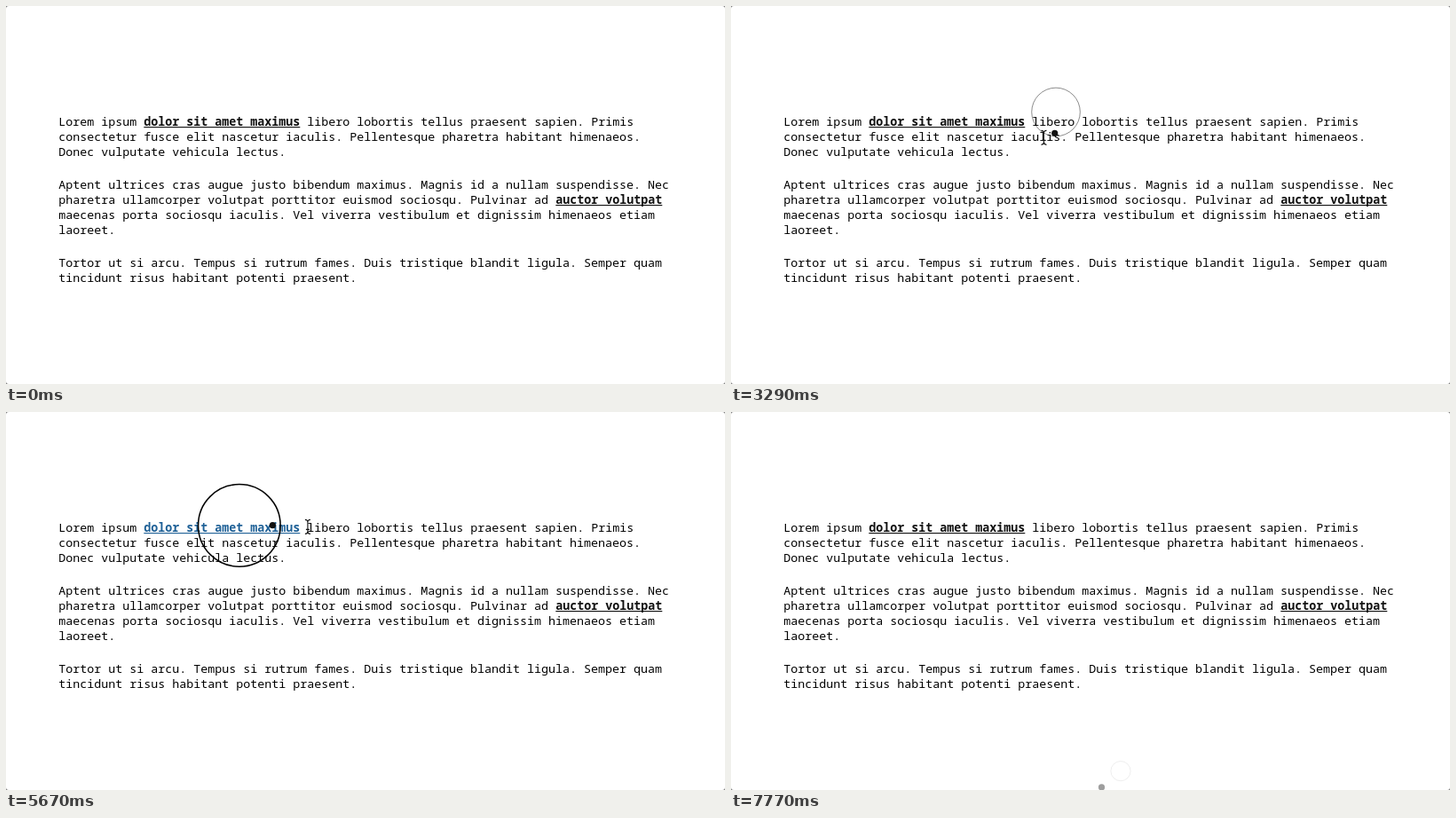
An HTML page that plays this animation: 810 px wide and 426 px high, repeating every 7.84 s.

```html
<!DOCTYPE html>
<html lang="la">
<head>
<meta charset="utf-8">
<title>Cursor follower</title>
<style>
  html, body { margin: 0; width: 100%; height: 100%; overflow: hidden; background: #777; }
  svg { display: block; width: 100%; height: 100%; }
  text { font: 500 13.333px "Noto Sans Mono", "DejaVu Sans Mono", monospace; fill: #000; white-space: pre; }
  .link text { font-weight: 600; fill: inherit; }
</style>
</head>
<body>
<svg viewBox="0 0 810 426">
  <rect width="810" height="426" rx="3" fill="#fff"/>
  <g id="copy"></g>
  <circle id="ring" r="27.3" fill="none" stroke="#000" stroke-width=".9"/>
  <circle id="dot" r="3.6" fill="#111"/>
  <g id="pointer" stroke-linejoin="round">
    <path id="arrow" d="M0 0V15L3.6 11.8 6 17.2 8.6 16 6.2 11H11Z" fill="#000" stroke="#fff"/>
    <path id="beam" d="M-3-8Q0-8 0-5V5Q0 8-3 8M3-8Q0-8 0-5M0 5Q0 8 3 8M-2 3H2" fill="none" stroke="#111" stroke-width="1.1"/>
    <path id="hand" d="M-1 1C-2-1 1-2 2 1L4 7C5 5 7 6 7 7 8 5.5 10 6 10 8 11 7 13 8 12.5 10L12 14 10.5 17H3L0 13-4 9C-5 7-3 6.5-1 8L1 9ZM4.5 11V14M7 11V14M9.5 11V14" fill="#fff" stroke="#111"/>
  </g>
</svg>
<script>
const LOOP = 7840, FRAME = 70, STEP = 10;
const LEFT = 59.3, CHAR = 8, LEADING = 17, PARAGRAPH_GAP = 20;
const DOT_LAG = 75, RING_LAG = 250;
const ENTER = 890, LEAVE = 7600;
const $ = id => document.getElementById(id);

// Asterisks enclose links; an empty line separates paragraphs.
const copy = `Lorem ipsum *dolor sit amet maximus* libero lobortis tellus praesent sapien. Primis
consectetur fusce elit nascetur iaculis. Pellentesque pharetra habitant himenaeos.
Donec vulputate vehicula lectus.

Aptent ultrices cras augue justo bibendum maximus. Magnis id a nullam suspendisse. Nec
pharetra ullamcorper volutpat porttitor euismod sociosqu. Pulvinar ad *auctor volutpat*
maecenas porta sociosqu iaculis. Vel viverra vestibulum et dignissim himenaeos etiam
laoreet.

Tortor ut si arcu. Tempus si rutrum fames. Duis tristique blandit ligula. Semper quam
tincidunt risus habitant potenti praesent.`;

// The mouse wanders along a smooth curve through evenly timed points.
const PATH_START = 700, PATH_STEP = 350;
const path = [
  [548, -40], [490, 50], [428, 150], [470, 285], [257.5, 310.5], [142, 178], [400, 24],
  [376, 141], [310, 138], [247, 137], [246, 136], [222, 134], [183, 133], [230, 129],
  [291, 127], [590, 150], [618, 211], [631, 224], [600, 280], [440, 403], [416, 425]
];

const clamp = v => Math.max(0, Math.min(1, v));
const smooth = v => v * v * (3 - 2 * v);
const isPresent = t => (t >= 70 && t < 250) || (t >= ENTER && t < LEAVE);

function mouseAt(t) {
  const last = path.length - 1;
  const at = Math.max(0, (Math.min(t, LEAVE) - PATH_START) / PATH_STEP);
  const i = Math.floor(at), u = at - i;
  const point = k => path[Math.max(0, Math.min(last, k))];
  return [0, 1].map(axis => {
    const [p, a, b, n] = [-1, 0, 1, 2].map(k => point(i + k)[axis]);
    const value = a + (b - a) * smooth(u) + (b - p) / 2 * u * (1 - u) ** 2 - (n - a) / 2 * u * u * (1 - u);
    return Math.max(0, value);
  });
}

function add(parent, tag, attrs, content = "") {
  const node = document.createElementNS("http://www.w3.org/2000/svg", tag);
  for (const name in attrs) node.setAttribute(name, attrs[name]);
  node.textContent = content;
  return parent.appendChild(node);
}

const links = [], spans = [];
let y = 135;
for (const line of copy.split("\n")) {
  if (!line) { y += PARAGRAPH_GAP; continue; }
  let x = LEFT;
  line.split("*").forEach((part, i) => {
    const width = part.length * CHAR;
    if (i % 2) {
      const node = add($("copy"), "g", { class: "link" });
      add(node, "text", { x, y }, part);
      add(node, "rect", { x, y: y + 1, width, height: 1.1 });
      links.push({ x, y, width, node });
    } else if (part) {
      add($("copy"), "text", { x, y }, part);
    }
    x += width;
  });
  spans.push({ x: LEFT, y, width: x - LEFT });
  y += LEADING;
}

const within = (box, [px, py], top, bottom) =>
  px >= box.x && px <= box.x + box.width && py > box.y - top && py <= box.y + bottom;

function shapeAt(mouse, target) {
  if (target >= 0) return "hand";
  return spans.some(s => within(s, mouse, 16, 0)) ? "beam" : "arrow";
}

// Runs the follower once, keeping one state per displayed frame.
function simulate() {
  const states = [];
  const dot = mouseAt(LOOP), ring = mouseAt(LOOP), glow = links.map(() => 0);
  let presence = 0, hover = 0;
  const ramp = (v, on, ms) => clamp(v + (on ? STEP : -STEP) / ms);
  const chase = (follower, goal, lag) =>
    follower.forEach((v, i) => follower[i] += (goal[i] - v) * (1 - Math.exp(-STEP / lag)));

  for (let t = 0; t < LOOP; t += STEP) {
    const mouse = mouseAt(t), present = isPresent(t);
    const target = present ? links.findIndex(l => within(l, mouse, 13, 4)) : -1;
    presence = ramp(presence, present, 320);
    hover = ramp(hover, target >= 0, 450);
    glow.forEach((g, i) => glow[i] = ramp(g, i === target, 200));
    chase(dot, mouse, DOT_LAG);
    chase(ring, mouse, RING_LAG);
    if (t % FRAME === 0) states.push({
      mouse, present, shape: shapeAt(mouse, target), dot: [...dot], ring: [...ring],
      presence: smooth(presence), hover: smooth(hover), glow: glow.map(smooth)
    });
  }
  return states;
}

const states = simulate();
const mix = (from, to, u) => `rgb(${from.map((v, i) => Math.round(v + (to[i] - v) * u))})`;
const move = (id, [x, y], scale = 1) => $(id).setAttribute("transform", `translate(${x} ${y}) scale(${scale})`);

function render(time) {
  const s = states[Math.floor(time % LOOP / FRAME)];
  move("ring", s.ring, s.presence * (1 + 0.7 * s.hover));
  $("ring").setAttribute("opacity", s.presence * (0.5 + 0.5 * s.hover));
  move("dot", s.dot);
  $("dot").setAttribute("opacity", s.presence);
  move("pointer", s.mouse);
  for (const id of ["arrow", "beam", "hand"])
    $(id).setAttribute("visibility", s.present && s.shape === id ? "visible" : "hidden");
  links.forEach((l, i) => l.node.setAttribute("fill", mix([17, 17, 17], [31, 99, 155], s.glow[i])));
}

const start = performance.now();
function tick() {
  render(performance.now() - start);
  requestAnimationFrame(tick);
}
tick();
</script>
</body>
</html>
```
